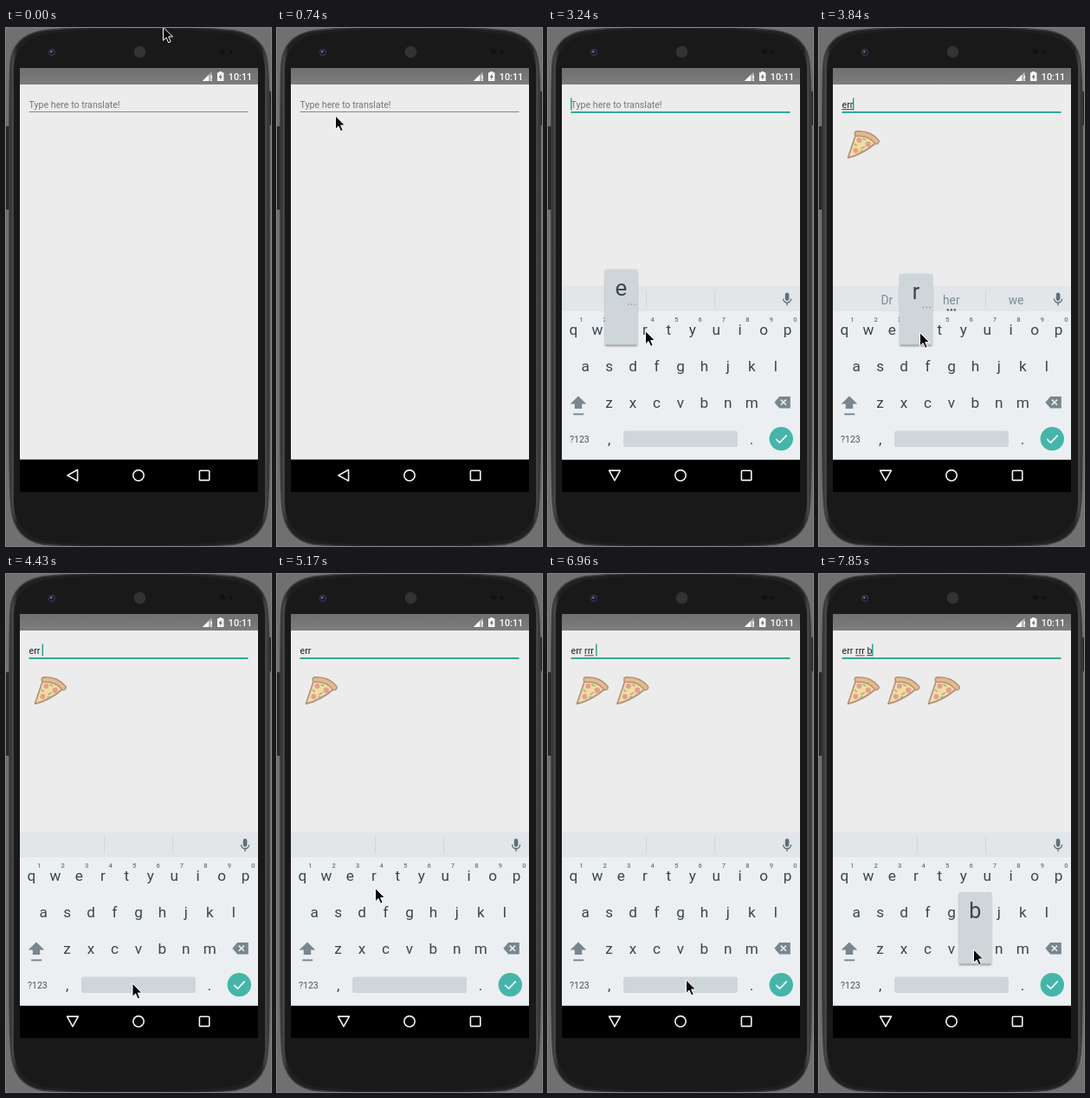
Recreate the animation shown at these times as an HTML page. Size 306x596 px, loop 7.99 s.

```html
<!DOCTYPE html>
<html lang="en">
<head>
<meta charset="utf-8">
<title>Type to translate</title>
<style>
html, body { margin: 0; width: 100%; height: 100%; overflow: hidden; background: #707070; }
svg { display: block; width: 306px; height: 596px; }
text { font-family: Roboto, "Noto Sans", sans-serif; white-space: pre; }
.key { font-size: 17.2px; fill: #37474f; text-anchor: middle; }
.num { font-size: 7.6px; font-weight: 500; fill: #66777f; text-anchor: middle; }
.word { font-size: 13.8px; fill: #7c8b92; text-anchor: middle; }
.field { font-size: 10.67px; }
</style>
</head>
<body>
<svg viewBox="0 0 306 596" xmlns="http://www.w3.org/2000/svg">
  <defs>
    <linearGradient id="band">
      <stop offset="0" stop-color="#292929"/><stop offset=".012" stop-color="#484848"/>
      <stop offset=".03" stop-color="#202020"/><stop offset=".97" stop-color="#202020"/>
      <stop offset=".988" stop-color="#484848"/><stop offset="1" stop-color="#292929"/>
    </linearGradient>
    <linearGradient id="bar" x2="0" y2="1">
      <stop offset="0" stop-color="#6f6f6f"/><stop offset="1" stop-color="#7d7d7d"/>
    </linearGradient>
    <pattern id="mesh" width="2" height="2" patternUnits="userSpaceOnUse">
      <rect width="2" height="2" fill="#262626"/><circle cx="1" cy="1" r=".6" fill="#5c5c5c"/>
    </pattern>
    <clipPath id="screen"><rect x="16" y="65" width="275" height="431.5"/></clipPath>
    <filter id="soft" x="-30%" y="-30%" width="160%" height="160%"><feGaussianBlur stdDeviation="1.2"/></filter>
    <g id="pizza" stroke-linejoin="round" stroke-linecap="round">
      <path d="M33.4 149.4L42.5 122.5Q56 120 66 132Q51 145 33.4 149.4Z" fill="#f2dca4" stroke="#b3907e" stroke-width="1.7"/>
      <path d="M44 121.6Q58 120.6 66.3 130.6" fill="none" stroke="#b3907e" stroke-width="7"/>
      <path d="M44 121.6Q58 120.6 66.3 130.6" fill="none" stroke="#e3bb8b" stroke-width="4.2"/>
      <g fill="#e2a08e"><circle cx="46.4" cy="129" r="3"/><circle cx="56.8" cy="133.8" r="3.2"/><circle cx="42.4" cy="141" r="2.9"/></g>
      <path d="M49 138.5l3.2-1.8M51 127.4l2.6 1.2M41.3 133.4l1.8 1.6M48 142l2-1" fill="none" stroke="#a9b983" stroke-width="1.8"/>
    </g>
  </defs>

  <rect width="306" height="596" fill="#707070"/>
  <path d="M0 113h5v96H0zM302 73h4v39h-4z" fill="#272727"/>
  <path d="M4 120Q4 60 5 42Q7 9 42 3Q90 -2 153 -2Q216 -2 264 3Q300 9 302 42Q304 60 304 120V470Q304 530 302 552Q299 588 264 594Q216 598 153 598Q90 598 42 594Q9 588 6 552Q4 530 4 470Z" fill="url(#band)" stroke="#3c3c3c" stroke-width="1.5"/>
  <path d="M9 120V46Q11 14 45 7Q90 1 153 1Q216 1 261 7Q297 14 299 46V548Q296 583 261 590Q216 595 153 595Q90 595 45 590Q12 583 9 548Z" fill="#191919"/>
  <circle cx="53" cy="28" r="4.2" fill="#34343c"/>
  <circle cx="53" cy="28" r="2.6" fill="#14142c"/>
  <circle cx="52.3" cy="27.3" r="1.2" fill="#7678a6"/>
  <circle cx="154.5" cy="27.5" r="6.8" fill="url(#mesh)"/>
  <g fill="#101010"><circle cx="250" cy="27" r="2.8"/><circle cx="259.5" cy="27" r="1.8"/></g>

  <rect x="16" y="46" width="275" height="488" fill="#000"/>
  <rect x="16" y="65" width="275" height="431.5" fill="#ececec"/>
  <rect x="16" y="46" width="275" height="19" fill="url(#bar)"/>
  <path d="M227 61L237.5 50.5V61Z" fill="#b4b4b4"/>
  <path d="M227 61L234 54V61Z" fill="#fff"/>
  <path d="M236.6 54.5h1.4v4h-1.4zM236.6 59.5h1.4v1.5h-1.4z" fill="#fff"/>
  <path d="M244 51.3h2.2V50h3v1.3h2.2V61H244Z" fill="#fff"/>
  <path d="M248.4 52.6L245.6 57h1.7v3l2.7-4.5h-1.6Z" fill="#777"/>
  <text x="256.8" y="60" font-size="10.8" font-weight="500" fill="#fff">10:11</text>

  <text id="hint" class="field" x="26.5" y="92" fill="#757575">Type here to translate!</text>
  <text id="typed" class="field" x="26.5" y="92" fill="#1f1f1f"></text>
  <rect id="compose" y="93.2" height="1"/>
  <rect id="wrong" x="42" y="93.2" width="10.8" height="1.2" fill="#d9483b"/>
  <rect id="line" x="26.5" width="253"/>
  <rect id="caret" y="80.5" width="1.3" height="14" fill="#159688"/>
  <g id="slices"></g>

  <g clip-path="url(#screen)">
    <g id="board">
      <rect x="16" y="297" width="275" height="200" fill="#eceff1"/>
      <rect x="16" y="297" width="275" height="29" fill="#e2e6e9"/>
      <path d="M113.5 302v19.5M192.5 302v19.5" stroke="#cfd6da"/>
      <g id="words">
        <text class="word" x="78.3" y="317.5"></text>
        <text class="word" x="152.8" y="317.5"></text>
        <text class="word" x="227.5" y="317.5"></text>
        <g fill="#4d5c63"><circle cx="148.8" cy="324.2" r="1.2"/><circle cx="152.8" cy="324.2" r="1.2"/><circle cx="156.8" cy="324.2" r="1.2"/></g>
      </g>
      <rect x="273.8" y="304.5" width="4.6" height="9.4" rx="2.3" fill="#5f7079"/>
      <path d="M271.6 311.5a4.5 4.5 0 0 0 9 0M276.1 316v3.3" fill="none" stroke="#5f7079" stroke-width="1.4"/>
      <g id="keys"></g>
      <path d="M35 423.5L44.3 432.5H39.2V438H30.8V432.5H25.7Z" fill="#78878e"/>
      <rect x="29.2" y="443.4" width="12" height="1.9" fill="#78878e"/>
      <path d="M267.2 424H279.8V437.4H267.2L261.4 430.7Z" fill="#78878e"/>
      <path d="M268.8 427.6l6.2 6.2m0-6.2l-6.2 6.2" stroke="#eceff1" stroke-width="1.5"/>
      <text x="36.4" y="476.6" font-size="10.6" fill="#46555c" text-anchor="middle">?123</text>
      <rect x="87" y="463.5" width="132" height="18.5" rx="2.5" fill="#cfd6da"/>
      <circle cx="269.3" cy="472.6" r="13.7" fill="#45b5aa"/>
      <path d="M263.2 472.8l4.3 4.2 8.2-8.3" fill="none" stroke="#fff" stroke-width="1.7"/>
      <g id="popup">
        <rect id="shade" width="37" fill="#000" opacity=".4" filter="url(#soft)"/>
        <rect id="card" width="38" rx="1.5" fill="#cfd6d9"/>
        <text id="big" fill="#37474f" text-anchor="middle"></text>
        <g id="more" fill="#7d8a90"><circle r=".8"/><circle cx="3.9" r=".8"/><circle cx="7.8" r=".8"/></g>
      </g>
    </g>
  </g>

  <g fill="none" stroke="#f2f2f2" stroke-width="1.6" stroke-linejoin="round">
    <path id="back" d="M71 514.7L82.6 508.3V521.1Z"/>
    <circle cx="153" cy="514.8" r="6.2"/>
    <rect x="223.4" y="509.2" width="11.4" height="11.2" rx="1"/>
  </g>
  <path id="cursor" d="M0 0V15.4L3.6 12L6.1 17.8L8.7 16.7L6.2 11H11Z" fill="#050505" stroke="#fff" stroke-width="1" stroke-linejoin="round"/>
</svg>
<script>
const LOOP = 7990, TICK = 147.7, PITCH = 27.45;
const $ = id => document.getElementById(id);
const set = (el, attrs) => { for (const k in attrs) el.setAttribute(k, attrs[k]); };
const show = (el, on) => { el.style.display = on ? "" : "none"; };

function label(cls, x, y, str) {
  const el = document.createElementNS("http://www.w3.org/2000/svg", "text");
  set(el, { class: cls, x, y });
  el.textContent = str;
  $("keys").append(el);
}
[["qwertyuiop", 29.5, 353], ["asdfghjkl", 43.2, 395], ["zxcvbnm", 70.6, 437]].forEach(([row, x, y]) =>
  [...row].forEach((ch, i) => label("key", x + i * PITCH, y, ch)));
[..."1234567890"].forEach((n, i) => label("num", 38.3 + i * PITCH, 338.3, n));
label("key", 70.6, 478.5, ",");
label("key", 235, 478.5, ".");

for (let i = 0; i < 3; i++) {
  const use = document.createElementNS("http://www.w3.org/2000/svg", "use");
  set(use, { href: "#pizza", x: i * 46.5 });
  $("slices").append(use);
}

// Every track is a list of [start, ...values], held until the next entry.
const pointer = [
  [0, 181.5, -1], [150, 176, 12], [300, 150, 45], [450, 112, 77], [590, 80, 95], [740, 67.5, 101],
  [1330, 62, 99], [1480, 52, 92], [1630, 46.5, 89],
  [2500, 58, 140], [2650, 86, 235], [2800, 106, 325], [2950, 112.5, 348.5],
  [3390, 115, 350], [3690, 116.5, 350.5], [4130, 128, 410], [4280, 146, 471],
  [4580, 144, 464], [4730, 130, 420], [4870, 118, 375], [5020, 113.5, 361.5],
  [6060, 137.5, 379], [6210, 150, 430], [6360, 157, 458], [6510, 158.5, 464], [6660, 159.5, 467],
  [7250, 161, 462], [7400, 168, 448], [7550, 176, 436], [7700, 178.5, 432]
];
const edits = [
  [1770, ""], [3390, "e"], [3540, "er"], [3840, "err"], [4430, "err "],
  [5620, "err r"], [5770, "err rr"], [5920, "err rrr"], [6960, "err rrr "], [7850, "err rrr b"]
];
const hints = [[0], [3690, "Dr", "her", "we"], [4430], [5920, "Dr", "RR", "ft"], [6960]];
// letter, left, top, bottom, baseline, size, has alternatives
const E = ["e", 65.5, 277.5, 364.5, 308, 26, 1];
const R = ["r", 93, 282.5, 364.5, 311.5, 25, 1];
const B = ["b", 161.3, 366, 448.5, 396, 25, 0];
const pops = [[0], [3240, ...E], [3390], [3540, ...R], [3690], [3840, ...R], [3980],
  [5470, ...R], [5620], [5770, ...R], [6060], [7850, ...B]];
const board = [[0, 200, 0], [2070, 60, .5], [2220, 14, .85], [2360, 0, 1]];
const turn = [[0, 0], [1770, -45], [1920, -90]];

const at = (track, t) => track.reduce((hit, item) => item[0] <= t ? item : hit, null);
const advance = { e: 1086, r: 693, b: 1149, " ": 507 };
const width = str => [...str].reduce((sum, ch) => sum + advance[ch], 0) / 2048 * 10.67;

function drawField(t) {
  const edit = at(edits, t), focused = !!edit, str = focused ? edit[1] : "";
  show($("hint"), !str);
  $("typed").textContent = str;
  set($("line"), focused ? { y: 96, height: 1.9, fill: "#2aa297" } : { y: 96, height: 1, fill: "#858585" });

  const tick = Math.floor((t + 12) / TICK) * TICK;
  show($("caret"), focused && Math.max(0, tick - edit[0]) % 1000 < 500);
  $("caret").setAttribute("x", 26.2 + width(str));

  const tail = str.slice(str.lastIndexOf(" ") + 1);
  set($("compose"), { x: 26.5 + width(str) - width(tail), width: width(tail), fill: "#333" });
  show($("wrong"), str.startsWith("err rrr "));

  const count = str.split(" ").filter(Boolean).length;
  [...$("slices").children].forEach((slice, i) => show(slice, i < count));
}

function drawBoard(t) {
  const [, dy, alpha] = at(board, t);
  set($("board"), { transform: `translate(0 ${dy})`, opacity: alpha });

  const words = at(hints, t).slice(1);
  show($("words"), words.length);
  $("words").querySelectorAll("text").forEach((el, i) => { el.textContent = words[i] || ""; });

  const [, ch, x, top, bottom, base, size, more] = at(pops, t);
  show($("popup"), ch);
  if (!ch) return;
  set($("shade"), { x: x + .5, y: top + 2, height: bottom - top - .5 });
  set($("card"), { x, y: top, height: bottom - top });
  set($("big"), { x: x + 19, y: base, "font-size": size });
  $("big").textContent = ch;
  show($("more"), more);
  $("more").setAttribute("transform", `translate(${x + 27.3} ${base + 10})`);
}

function draw(t) {
  drawField(t);
  drawBoard(t);
  $("back").setAttribute("transform", `rotate(${at(turn, t)[1]} 77 514.7)`);
  const [, x, y] = at(pointer, t);
  $("cursor").setAttribute("transform", `translate(${x} ${y})`);
}

const start = performance.now();
function frame() {
  draw((performance.now() - start) % LOOP);
  requestAnimationFrame(frame);
}
frame();
</script>
</body>
</html>
```
